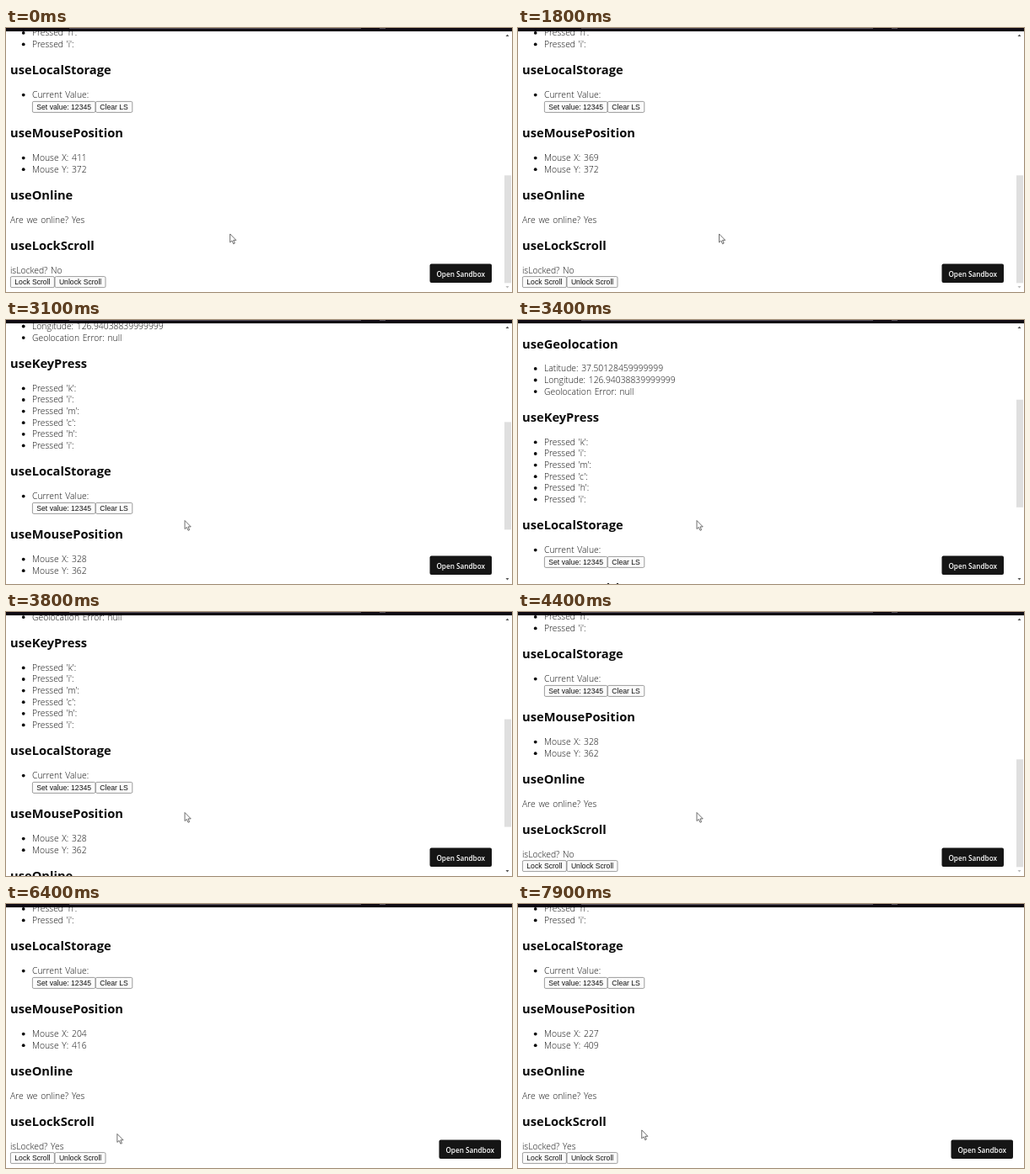
An HTML page that plays this animation: 600x314 px, repeating every 8 s.

```html
<!DOCTYPE html>
<html lang="en">
<head>
<meta charset="utf-8">
<title>Hooks demo</title>
<style>
  html, body { margin: 0; width: 100%; height: 100%; overflow: hidden; background: #fff; }
  svg { display: block; width: 100%; height: 100%; }
  text { white-space: pre; }
  .head { font: 700 14.7px "Open Sans", "Noto Sans", sans-serif; fill: #0c0c0c; }
  .body { font: 300 10.35px "Open Sans", "Noto Sans", sans-serif; fill: #111; word-spacing: 1px; }
  .label { font: 8.63px "Liberation Sans", Arial, sans-serif; fill: #111; }
  .button { fill: #fbfbfb; stroke: #858585; stroke-width: .8; }
  .open { font: 600 8.2px "Open Sans", "Noto Sans", sans-serif; fill: #fff; text-anchor: middle; }
</style>
</head>
<body>
<svg viewBox="0 0 600 314" preserveAspectRatio="none">
  <g id="page"></g>
  <g id="bar">
    <path d="M592.5 10 h4 l-2 -2.5 z" fill="#555"/>
    <rect id="thumb" x="591" width="8" height="128" fill="#dfdfdf"/>
    <path id="down" d="M592.5 307 h4 l-2 2.5 z"/>
  </g>
  <g id="open">
    <rect x="502.5" y="280.5" width="73.5" height="22.5" rx="2" fill="#151515"/>
    <text class="open" x="539.2" y="295.5">Open Sandbox</text>
  </g>
  <rect width="600" height="4" fill="#0d0811"/>
  <path d="M75 .5 H421 M443 .5 H450" stroke="#55505a"/>
  <path id="cursor" d="M0 0 V10 L2.3 8 L4 11.8 L5.6 11.1 L4 7.4 H7.2 Z"
    fill="#fff" stroke="#4a4a4a" stroke-width=".8" stroke-linejoin="round"/>
</svg>
<script>
const LOOP = 8000, TICK = 100, LOCK_AT = 5500;
const ZOOM = 1.547;   // page pixels per stage pixel
const LINE = 13.6;

// time, distance scrolled up from the bottom
const scrollKeys = [
  [0, 0], [2300, 0], [2400, 22], [2500, 65], [3100, 130], [3200, 142],
  [3400, 194], [3500, 194], [3800, 115], [4400, 0]
];
// time, mouse x, mouse y
const mouseKeys = [
  [0, 411, 372], [300, 400, 374], [800, 400, 374], [1200, 383, 375],
  [1700, 383, 375], [2100, 328, 362], [4400, 328, 362], [5300, 68, 457],
  [5800, 68, 457], [6500, 227, 409]
];

const $ = id => document.getElementById(id);
const page = $("page");

function add(tag, attrs, text = "") {
  const el = document.createElementNS("http://www.w3.org/2000/svg", tag);
  for (const name in attrs) el.setAttribute(name, attrs[name]);
  el.textContent = text;
  return page.appendChild(el);
}
const write = (cls, x, y, text) => add("text", { class: cls, x, y }, text);
const heading = (y, text) => write("head", 5, y, text);

function list(y, items) {
  return items.map((item, i) => {
    const base = y + i * LINE;
    add("circle", { cx: 20.7, cy: base - 3.4, r: 1.9, fill: "#0c0c0c" });
    return write("body", 31, base, item);
  });
}
function button(x, y, width, text) {
  add("rect", { class: "button", x, y, width, height: 13, rx: 1.5 });
  write("label", x + 4.9, y + 9.6, text);
}

heading(-160.5, "useGeolocation");
list(-132.7, ["Latitude: 37.50128459999999", "Longitude: 126.94038839999999", "Geolocation Error: null"]);
heading(-73, "useKeyPress");
list(-45.2, [..."kimchi"].map(key => `Pressed '${key}':`));
heading(55, "useLocalStorage");
list(83, ["Current Value:"]);
button(31.4, 87.4, 74.6, "Set value: 12345");
button(106.4, 87.4, 43.4, "Clear LS");
heading(130, "useMousePosition");
const [mouseX, mouseY] = list(158, ["", ""]);
heading(204, "useOnline");
write("body", 5, 232, "Are we online? Yes");
heading(264, "useLockScroll");
const locked = write("body", 5, 291.5, "");
button(5.4, 295.6, 52, "Lock Scroll");
button(58, 295.6, 60, "Unlock Scroll");

function sample(keys, t) {
  const next = keys.findIndex(key => key[0] > t);
  if (next < 0) return keys[keys.length - 1].slice(1);
  const a = keys[next - 1], b = keys[next];
  const k = (t - a[0]) / (b[0] - a[0]);
  return a.slice(1).map((v, i) => v + (b[i + 1] - v) * k);
}

function draw(t) {
  const [up] = sample(scrollKeys, t);
  const [x, y] = sample(mouseKeys, t).map(Math.round);
  const isLocked = t >= LOCK_AT;

  page.setAttribute("transform", `translate(0 ${up})`);
  $("thumb").setAttribute("y", 175.3 - up * 0.415);
  $("down").setAttribute("fill", up > 0 ? "#555" : "#bbb");
  $("bar").setAttribute("visibility", isLocked ? "hidden" : "visible");
  $("open").setAttribute("transform", `translate(${isLocked ? 11 : 0} 0)`);
  $("cursor").setAttribute("transform", `translate(${x / ZOOM} ${y / ZOOM + 4.5})`);
  mouseX.textContent = `Mouse X: ${x}`;
  mouseY.textContent = `Mouse Y: ${y}`;
  locked.textContent = `isLocked? ${isLocked ? "Yes" : "No"}`;
}

const start = performance.now();
function frame() {
  const t = (performance.now() - start) % LOOP;
  draw(Math.floor(t / TICK) * TICK);
  requestAnimationFrame(frame);
}
frame();
</script>
</body>
</html>
```
